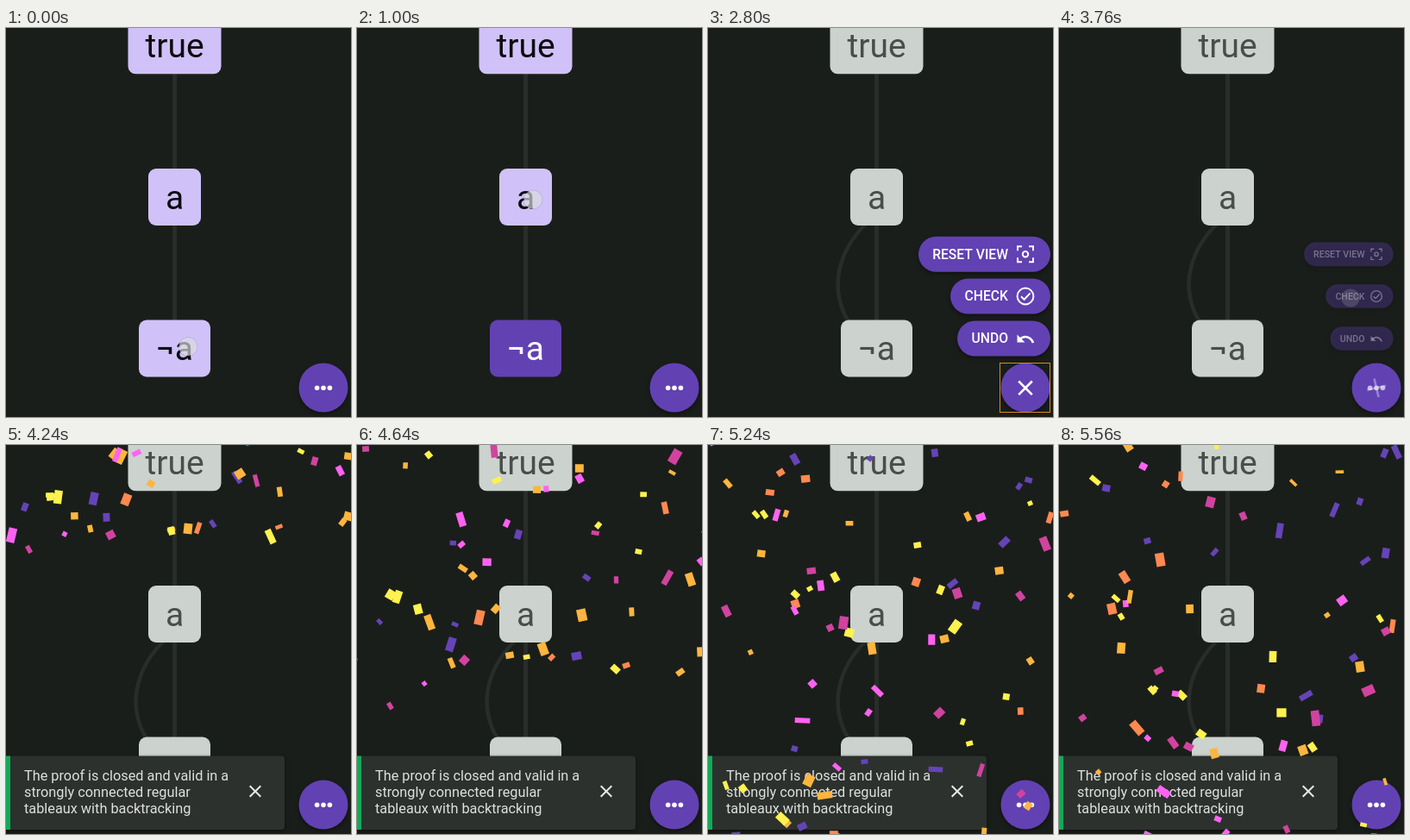
These frames come from a looping animation (400x451 px, 5.6 s). An HTML page with a canvas:

```html
<!DOCTYPE html>
<html lang="en">
<head>
<meta charset="utf-8">
<title>Proof tree</title>
<style>
html, body { margin: 0; width: 100%; height: 100%; overflow: hidden; background: #1a1e1a; }
canvas { display: block; width: 400px; height: 451px; }
</style>
</head>
<body>
<canvas id="stage"></canvas>
<script>
const W = 400, H = 451, LOOP = 5600, STEP = 40;
const canvas = document.getElementById('stage');
const ctx = canvas.getContext('2d');
const dpr = window.devicePixelRatio || 1;
canvas.width = W * dpr;
canvas.height = H * dpr;

const FONT = 'Roboto, "Liberation Sans", sans-serif';
const BG = '#1a1e1a', LINE = '#292d29', PRIMARY = '#6241b3';
const LILAC = [208, 194, 248], GREY = [204, 210, 205], PURPLE = [98, 65, 179];
const BLACK = [12, 12, 14], DIM = [74, 78, 75], WHITE = [255, 255, 255];
const CONFETTI = ['#6544b8', '#d1439f', '#ff62f2', '#ff8950', '#ffb53e', '#fff14f'];

const clamp = v => Math.max(0, Math.min(1, v));
const ease = v => v * v * (3 - 2 * v);
const span = (t, a, b) => ease(clamp((t - a) / (b - a)));
const mix = (a, b, k) => a.map((v, i) => v + (b[i] - v) * k);
const rgb = c => `rgb(${c.map(Math.round).join(',')})`;

function seeded(seed) {
  return () => {
    seed = (seed + 0x6D2B79F5) | 0;
    let r = Math.imul(seed ^ (seed >>> 15), 1 | seed);
    r = (r + Math.imul(r ^ (r >>> 7), 61 | r)) ^ r;
    return ((r ^ (r >>> 14)) >>> 0) / 4294967296;
  };
}

const rnd = seeded(23);
const pieces = Array.from({ length: 125 }, () => ({
  birth: 3850 + 1900 * Math.pow(rnd(), 1.3),
  x: -10 + 420 * rnd(),
  drift: (rnd() - 0.5) * 0.08,
  speed: 0.2 + 0.17 * rnd(),
  w: 5 + 6 * rnd(),
  h: 8 + 11 * rnd(),
  angle: (rnd() - 0.5) * 1.4,
  spin: (rnd() - 0.5) * 0.0025,
  flip: rnd() * 6.28,
  color: CONFETTI[Math.floor(rnd() * CONFETTI.length)]
}));

function box(x, y, w, h, r, fill) {
  ctx.beginPath();
  ctx.roundRect(x, y, w, h, r);
  ctx.fillStyle = fill;
  ctx.fill();
}

function disc(x, y, r, fill) {
  ctx.beginPath();
  ctx.arc(x, y, r, 0, Math.PI * 2);
  ctx.fillStyle = fill;
  ctx.fill();
}

function stroke(path, color, width) {
  ctx.strokeStyle = color;
  ctx.lineWidth = width;
  ctx.stroke(new Path2D(path));
}

function label(text, x, y, size, color, align = 'left', weight = 400) {
  ctx.font = `${weight} ${size}px ${FONT}`;
  ctx.textAlign = align;
  ctx.fillStyle = color;
  ctx.fillText(text, x, y);
}

function cross(x, y, r, color, width) {
  stroke(`M${x - r} ${y - r}L${x + r} ${y + r}M${x + r} ${y - r}L${x - r} ${y + r}`, color, width);
}

function shadow(on) {
  ctx.shadowColor = on ? 'rgba(0,0,0,.45)' : 'transparent';
  ctx.shadowBlur = on ? 5 * dpr : 0;
  ctx.shadowOffsetY = on ? 2 * dpr : 0;
}

function node(text, y, w, fill, ink) {
  box(195.5 - w / 2, y - 33, w, 66, 9, rgb(fill));
  label(text, 195.5, y + 13.5, 39, rgb(ink), 'center');
}

function tree(t) {
  const picked = span(t, 360, 640);
  const closed = span(t, 1320, 1520);
  stroke('M195.5 40V350', LINE, 5);
  if (closed > 0) {
    ctx.globalAlpha = closed;
    stroke('M183 227C156 254 137 296 163 341', LINE, 4.5);
    ctx.globalAlpha = 1;
  }
  const fill = mix(LILAC, GREY, closed), ink = mix(BLACK, DIM, closed);
  node('true', 20.3, 108, fill, ink);
  node('a', 196, 61, fill, ink);
  node('¬a', 371.5, 83,
    mix(mix(LILAC, PURPLE, picked), GREY, closed),
    mix(mix(BLACK, WHITE, picked), DIM, closed));
}

function resetIcon(y) {
  for (const sx of [-1, 1]) for (const sy of [-1, 1]) {
    stroke(`M${368 + sx * 9} ${y + sy * 4}V${y + sy * 9}H${368 + sx * 4}`, '#fff', 2);
  }
  ctx.beginPath();
  ctx.arc(368, y, 3.2, 0, 7);
  ctx.stroke();
}

function checkIcon(y) {
  ctx.beginPath();
  ctx.arc(368, y, 9.4, 0, 7);
  ctx.strokeStyle = '#fff';
  ctx.lineWidth = 2;
  ctx.stroke();
  stroke(`M363 ${y + .3}L366.6 ${y + 3.8}L373.6 ${y - 3.6}`, '#fff', 2);
}

function undoIcon(y) {
  stroke(`M361 ${y + 1.5}C366 ${y - 4} 374 ${y - 3} 377 ${y + 5}`, '#fff', 2.6);
  ctx.fillStyle = '#fff';
  ctx.fill(new Path2D(`M358.5 ${y - 4.5}V${y + 4.5}H367.5Z`));
}

const MENU = [
  ['UNDO', 289, 360, undoIcon],
  ['CHECK', 281, 311, checkIcon],
  ['RESET VIEW', 244, 262.3, resetIcon]
];

function menu(t) {
  MENU.forEach(([text, x, y, icon], i) => {
    const k = span(t, 2360 + i * 60, 2600 + i * 60) * (1 - span(t, 3640, 3840));
    if (k <= 0) return;
    ctx.save();
    ctx.globalAlpha = k;
    ctx.translate(368, y);
    ctx.scale(0.5 + k / 2, 0.5 + k / 2);
    ctx.translate(-368, -y);
    shadow(true);
    box(x, y - 20.5, 397 - x, 41, 20.5, PRIMARY);
    shadow(false);
    label(text, 348, y + 5.4, 15.7, '#fff', 'right', 500);
    icon(y);
    ctx.restore();
  });
}

function fab(t) {
  const open = span(t, 2320, 2560) * (1 - span(t, 3640, 3840));
  shadow(true);
  disc(368, 417, 28.5, PRIMARY);
  shadow(false);
  ctx.globalAlpha = 1 - open;
  for (const dx of [-7.4, 0, 7.4]) disc(368 + dx, 417.3, 2.8, '#fff');
  ctx.globalAlpha = open;
  ctx.save();
  ctx.translate(368, 417.3);
  ctx.rotate((open - 1) * Math.PI / 2);
  cross(0, 0, 7.8, '#fff', 2.6);
  ctx.restore();
  ctx.globalAlpha = 1;
  if (t >= 2360 && t < 3680) {
    ctx.strokeStyle = '#d98a25';
    ctx.lineWidth = 1;
    ctx.strokeRect(338.5, 388.5, 58, 57);
  }
}

function toast(t) {
  const k = span(t, 3720, 4040);
  if (k <= 0) return;
  ctx.save();
  ctx.globalAlpha = k;
  ctx.translate(0, 95 * (1 - k));
  shadow(true);
  box(-5, 360.5, 328, 85.5, 4, '#2d312e');
  shadow(false);
  ctx.fillStyle = '#10ab56';
  ctx.fillRect(0, 360.5, 5, 85.5);
  ['The proof is closed and valid in a',
    'strongly connected regular',
    'tableaux with backtracking'
  ].forEach((line, i) => label(line, 21, 389 + i * 19.2, 16.3, '#dde0dd'));
  cross(289, 401.5, 6.3, '#e6e8e6', 2);
  ctx.restore();
}

function confetti(t) {
  for (const p of pieces) {
    const age = t - p.birth;
    if (age < 0) continue;
    const y = -12 + p.speed * age + 0.00008 * age * age;
    if (y > H + 20) continue;
    ctx.save();
    ctx.translate(p.x + p.drift * age, y);
    ctx.rotate(p.angle + p.spin * age);
    const h = p.h * (0.72 + 0.28 * Math.cos(p.flip + age * 0.006));
    ctx.fillStyle = p.color;
    ctx.fillRect(-p.w / 2, -h / 2, p.w, h);
    ctx.restore();
  }
}

// Taps: start, end, x, y
const TAPS = [
  [0, 360, 211, 369.5],
  [1000, 1320, 204, 199],
  [1920, 2320, 365.5, 415],
  [3200, 3640, 338, 313]
];

function taps(t) {
  for (const [from, to, x, y] of TAPS) {
    const k = 1 - clamp((t - to) / 160);
    if (t < from || k <= 0) continue;
    ctx.globalAlpha = k;
    disc(x, y, 11.3, 'rgba(110,110,120,.2)');
    disc(x, y, 10.5, 'rgba(236,238,240,.58)');
    ctx.globalAlpha = 1;
  }
}

function draw(t) {
  ctx.setTransform(dpr, 0, 0, dpr, 0, 0);
  ctx.fillStyle = BG;
  ctx.fillRect(0, 0, W, H);
  tree(t);
  menu(t);
  fab(t);
  toast(t);
  confetti(t);
  taps(t);
}

const start = performance.now();
function tick() {
  const t = (performance.now() - start) % LOOP;
  draw(Math.floor(t / STEP) * STEP);
  requestAnimationFrame(tick);
}
tick();
</script>
</body>
</html>
```
